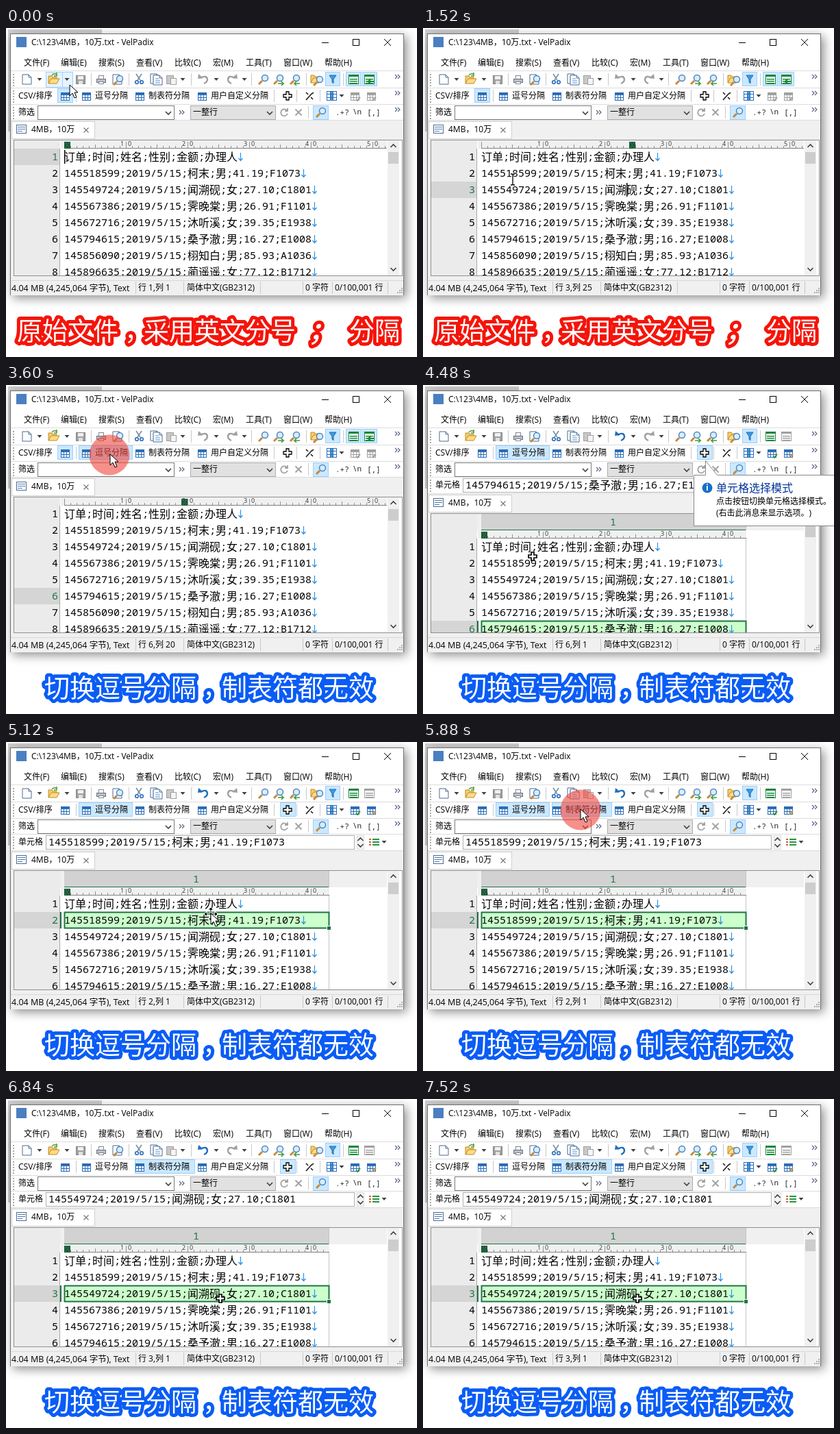
Recreate the animation shown at these times as an HTML page with a canvas. Size 600 by 480 pixels, loop 8000 ms.

```html
<!DOCTYPE html>
<html lang="zh-CN">
<head>
<meta charset="utf-8">
<style>
html, body { margin: 0; width: 600px; height: 480px; overflow: hidden; background: #fff }
canvas { display: block }
</style>
</head>
<body>
<canvas id="stage" width="600" height="480"></canvas>
<script>
const ctx = document.getElementById('stage').getContext('2d');
const LOOP = 8000;
const CJK = "'Noto Sans CJK SC','Noto Sans CJK',sans-serif";
const UI = "'Open Sans'," + CJK;
const MONO = "'Noto Sans Mono'," + CJK;
const BLUE = '#2b6cb5', GREEN = '#217346', GREY = '#a0a0a0', INK = '#404040', RULE = '#dcdcdc';

const rows = ['订单;时间;姓名;性别;金额;办理人'].concat([
  '145518599;柯末;男;41.19;F1073', '145549724;闻溯砚;女;27.10;C1801',
  '145567386;霁晚棠;男;26.91;F1101', '145672716;沐听溪;女;39.35;E1938',
  '145794615;桑予澈;男;16.27;E1008', '145856090;栩知白;男;85.93;A1036',
  '145896635;蔺遥遥;女;77.12;B1712'
].map(r => r.replace(';', ';2019/5/15;')));

// Each step changes only the listed parts of the state.
const steps = [
  { t: 0, cur: ['arrow', 93, 83], line: 1, col: 1, caret: true, open: 1, mode: 0, hot: 0 },
  { t: 200, cur: ['beam', 291, 226], open: .5 },
  { t: 640, cur: ['beam', 298, 228], open: 0 },
  { t: 1520, cur: ['beam', 131, 221], line: 3, col: 25 },
  { t: 1640, line: 2, col: 6 },
  { t: 2160, cur: ['beam', 259, 306], line: 6, col: 20, sel: true },
  { t: 2520, line: 5, col: 21, sel: false },
  { t: 2920, line: 6, col: 20, blue: true, caret: false },
  { t: 3160, cur: ['arrow', 212, 114] },
  { t: 3600, cur: ['arrow', 152, 101], hot: 1, click: [151, 102] },
  { t: 3920, mode: 1, col: 1, tip: true, click: null },
  { t: 4480, cur: ['plus', 160, 250] },
  { t: 4560, cur: ['plus', 235, 350] },
  { t: 5120, cur: ['move', 299, 251], line: 2, tip: false },
  { t: 5440, cur: ['arrow', 254, 163] },
  { t: 5880, cur: ['arrow', 230, 98], hot: 2, click: [230, 99] },
  { t: 6080, cur: ['plus', 300, 259], mode: 2, hot: 0, tip: true, click: null },
  { t: 6520, cur: ['plus', 301, 281] },
  { t: 6840, cur: ['plus', 313, 291], line: 3, tip: false },
  { t: 7400, click: [313, 291] },
  { t: 7520, click: null }
];
const stateAt = t => Object.assign({}, ...steps.filter(s => s.t <= t));

function box(x, y, w, h, fill, stroke) {
  if (fill) { ctx.fillStyle = fill; ctx.fillRect(x, y, w, h); }
  if (stroke) { ctx.strokeStyle = stroke; ctx.lineWidth = 1; ctx.strokeRect(x + .5, y + .5, w - 1, h - 1); }
}
function shape(d, x, y, fill, stroke, width = 1) {
  const p = new Path2D(d);
  ctx.save();
  ctx.translate(x, y);
  if (fill) { ctx.fillStyle = fill; ctx.fill(p); }
  if (stroke) { ctx.strokeStyle = stroke; ctx.lineWidth = width; ctx.stroke(p); }
  ctx.restore();
}
function disc(x, y, r, fill, stroke, width) {
  shape(`M${-r} 0a${r} ${r} 0 1 0 ${2 * r} 0a${r} ${r} 0 1 0 ${-2 * r} 0`, x, y, fill, stroke, width);
}
// y is the vertical middle of the line of text.
function text(s, x, y, color = '#000', size = 12, family = UI, weight = 400) {
  ctx.font = `${weight} ${size}px ${family}`;
  ctx.fillStyle = color;
  ctx.fillText(s, x, y + size * .36);
}
const advance = ch => ch > '\u2e80' ? 16 : 9;
const widthOf = s => [...s].reduce((w, ch) => w + advance(ch), 0);
function mono(s, x, y) {
  for (const ch of s) {
    text(ch, x, y, '#000', advance(ch) === 16 ? 16 : 15, MONO);
    x += advance(ch);
  }
  return x;
}
function caretX(s, col) {
  let c = 1, x = 85;
  for (const ch of s) {
    if (c >= col) break;
    c += advance(ch) === 16 ? 2 : 1;
    x += advance(ch);
  }
  return x;
}

const sep = (x, y) => box(x, y - 9, 1, 18, '#c8c8c8');
const drop = (x, y) => shape('M-3.5-2h7l-3.5 4z', x, y, INK);
const chevron = (x, y, up) => shape(up ? 'M-4 2l4-4 4 4' : 'M-4-2l4 4 4-4', x, y, null, '#404040', 1.6);
const lit = (x, y, w, h = 21, fill = '#cce8ff') => box(x, y, w, h, fill, '#99d1ff');
const cross = (x, y, r, color, w) => shape(`M${-r} ${-r}L${r} ${r}M${r} ${-r}L${-r} ${r}`, x, y, null, color, w);
const more = (x, y) => shape('M-4-3l3 3-3 3M0-3l3 3-3 3', x, y, null, '#506080', 1.1);
function grip(y) {
  for (let i = -8; i <= 8; i += 4) box(10, y + i, 2, 2, '#a8a8a8');
}
function page(x, y, lines, edge = '#4a6a90') {
  shape('M0 0h9l4 4v10H0z', x, y, '#fff', edge);
  shape('M9 0v4h4', x, y, null, edge);
  if (lines) shape('M3 5h5M3 8h7M3 11h7', x, y, null, '#4f93d8');
}
function grid(x, y, color = BLUE) {
  box(x, y, 13, 12, '#fff', color);
  box(x, y, 13, 4, color);
  shape('M0 7.5h13M4.5 4v8M8.5 4v8', x, y, null, color);
}
function folder(x, y) {
  shape('M0 12V1h5l1 2h6v3', x, y, '#f5cf72', '#c18a20');
  shape('M0 12l4-7h12l-4 7z', x, y, '#ffdc86', '#c18a20');
}
function lens(x, y, handle = '#c58a3c') {
  shape('M-2 2l-5 5', x, y, null, handle, 3);
  disc(x + 2, y - 2, 4.5, '#d9edfb', '#4a86c0', 1.5);
}
function printer(x, y) {
  box(x + 3, y, 8, 6, '#fff', '#808890');
  box(x, y + 5, 14, 6, '#b9c1ca', '#68727c');
  box(x + 3, y + 9, 8, 4, '#fff', '#808890');
}
function list(x, y, color) {
  box(x, y, 15, 14, '#fff', color);
  box(x, y, 15, 3, color);
  for (let i = 6; i < 13; i += 3) box(x + 2, y + i, 11, 1.5, color);
}
function turn(x, y, color, flip) {
  ctx.save();
  ctx.translate(x, y);
  ctx.scale(flip, 1);
  shape('M-4-2q9-5 10 2 0 4-5 6', 0, 0, null, color, 2.4);
  shape('M-8-1l1-7 7 6z', 0, 0, color);
  ctx.restore();
}

function drawFrame() {
  box(0, 0, 600, 480, '#fff');
  box(3, 2, 137, 149, '#cfcfcf');
  ctx.save();
  ctx.shadowColor = 'rgba(0,0,0,.45)';
  ctx.shadowBlur = 14;
  ctx.shadowOffsetX = ctx.shadowOffsetY = 4;
  box(6, 8, 575, 382, '#fff');
  ctx.restore();
  box(6, 8, 575, 382, '#fff', '#707070');
  box(15, 13, 15, 15, '#4a7fc0');
  text('C:\\123\\4MB，10万.txt - VelPadix', 37, 21);
  box(461, 21, 10, 1, '#000');
  box(506, 16, 10, 10, null, '#000');
  cross(557, 21, 5, '#000', 1);
  const menus = { 26: '文件(F)', 80: '编辑(E)', 135: '搜索(S)', 190: '查看(V)', 246: '比较(C)', 302: '宏(M)', 350: '工具(T)', 405: '窗口(W)', 465: '帮助(H)' };
  for (const x in menus) text(menus[x], +x, 51);
  for (const y of [62, 87, 111, 134]) box(7, y, 573, 1, RULE);
}

function drawMainBar(s) {
  const y = 75;
  grip(y);
  if (s.open) {
    ctx.globalAlpha = s.open;
    lit(58, 64, 40, 23, '#e5f3ff');
    box(82, 64, 1, 23, '#99d1ff');
    ctx.globalAlpha = 1;
  }
  page(24, 68);
  folder(62, 69);
  shape('M3 0q3-4 7-1v-3 5h-4', 64, 69, null, '#4c9a35', 1.5);
  box(102, 69, 14, 13, GREY, '#858585');
  box(105, 70, 8, 5, '#f0f0f0');
  box(106, 77, 6, 5, '#e0e0e0');
  printer(132, 69);
  page(156, 68);
  lens(164, 76);
  shape('M-4-6l6 9M4-6l-6 9', 194, 73, null, '#7590a8', 1.6);
  disc(191, 79, 2.3, null, BLUE, 1.6);
  disc(198, 79, 2.3, null, BLUE, 1.6);
  page(211, 67, true);
  page(215, 69, true);
  box(234, 69, 11, 13, '#c8c8c8', GREY);
  box(240, 73, 9, 10, '#f4f4f4', GREY);
  turn(288, y, s.mode ? '#1f6fc0' : GREY, 1);
  turn(330, y, GREY, -1);
  lens(376, y);
  lens(398, y);
  shape('M-3 4h8l-3-3m3 3l-3 3', 400, 77, null, '#3d9b35', 1.5);
  lens(422, y);
  shape('M5 4h-8l3-3m-3 3l3 3', 424, 77, null, '#3d9b35', 1.5);
  folder(445, 68);
  lens(456, 77);
  lit(466, 64, 22);
  shape('M-5-6H5L1 0v6l-2-2V0z', 477, y, '#3f9ae0', '#1d6fb5');
  if (!s.mode) { lit(496, 64, 23); lit(520, 64, 22); }
  list(500, 68, '#16863a');
  list(523, 68, s.mode ? GREY : '#16863a');
  if (!s.mode) shape('M5 0h-8l3-3m-3 3l3 3', 532, 78, null, '#16863a', 2);
  for (const x of [49, 89, 258, 307, 348]) drop(x, y);
  for (const x of [124, 179, 270, 358, 438, 492]) sep(x, y);
  more(572, 71);
}

function drawCsvBar(s) {
  const y = 99;
  grip(y);
  text('CSV/排序', 18, y);
  if (!s.mode) lit(75, 88, 23);
  if (s.mode === 1 || s.hot === 1) lit(106, 88, 79);
  if (s.mode === 2 || s.hot === 2) lit(188, 88, 88);
  if (s.mode) lit(400, 88, 23);
  for (const x of [80, 111, 189, 280]) grid(x, 94);
  for (const x of [503, 527]) grid(x, 94, s.mode ? BLUE : GREY);
  text('逗号分隔', 130, y);
  text('制表符分隔', 208, y);
  text('用户自定义分隔', 299, y);
  plus(411, y, 1.3);
  shape('M-5 6L4-4M-5-5l3 3M6-5l-2 2M5 5l-3-3', 443, y, null, '#202020', 1.7);
  box(468, 92, 15, 14, '#fff', BLUE);
  box(473, 92, 5, 14, '#3f9ae0', BLUE);
  shape('M0 4.5h15M0 9.5h15', 468, 92, null, BLUE);
  drop(490, y);
  shape('M0 0l2 2 4-5', 511, 104, null, s.mode ? '#2a9440' : GREY, 2);
  shape('M0 4l5-5', 535, 102, null, s.mode ? '#d08a30' : GREY, 2);
  for (const x of [102, 391, 424, 458]) sep(x, y);
  more(572, 95);
}

function drawFilterBar() {
  const y = 123;
  grip(y);
  text('筛选', 18, y);
  box(46, 113, 200, 21, '#fff', '#7a7a7a');
  chevron(237, y + 1);
  more(257, y);
  box(269, 113, 125, 21, '#e1e1e1', '#adadad');
  text('一整行', 273, y);
  chevron(385, y + 1);
  shape('M4-3A5 5 0 1 0 5 2M5-6v4H1', 406, y, null, GREY, 1.8);
  cross(427, y, 4.5, GREY, 1.8);
  sep(441, y);
  lit(448, 113, 23);
  lens(460, y);
  text('.+?', 481, y, '#222', 11, MONO, 500);
  text('\\n', 506, y - 1, '#222', 11, MONO, 500);
  text('[,]', 527, y, '#222', 11, MONO, 500);
  more(572, 119);
}

function drawTab(s, shift) {
  if (s.mode) {
    grip(146);
    text('单元格', 18, 146);
    box(58, 136, 451, 21, '#fff', '#b0b0b0');
    mono(rows[s.line - 1], 62, 146);
    box(512, 136, 11, 21, '#f4f4f4', '#dedede');
    chevron(517.5, 142, true);
    chevron(517.5, 151);
    shape('M5 2h10M5 6h10M5 10h10', 530, 140, null, '#2a9440', 2);
    shape('M0 2h3M0 6h3M0 10h3', 530, 140, null, '#d06030', 2);
    drop(552, 146);
    box(7, 158, 573, 1, RULE);
  }
  box(7, 135 + shift, 573, 255 - shift, '#f0f0f0');
  box(8, 136 + shift, 122, 26, '#fff', '#d0d0d0');
  box(15, 141 + shift, 15, 13, '#fff', '#4a6a90');
  shape('M2 3.5h11M2 6.5h11M2 9.5h7', 15, 141 + shift, null, '#4f78b0');
  text('4MB，10万', 37, 148 + shift);
  cross(117, 149 + shift, 3.5, '#777', 1.2);
  box(11, 163 + shift, 568, 199 - shift, '#fff', '#909090');
}

function drawRuler(s, y, right) {
  box(80, y, right - 80, 12, '#f0f0f0');
  box(85, y + 11, right - 85, 1, '#808080');
  for (let i = 0, x = 85; x < right; i++, x += 9) {
    const h = i % 10 ? (i % 5 ? 3 : 5) : 9;
    box(x, y + 11 - h, 1, h, '#909090');
    if (i && i % 10 === 0) {
      text(i / 10, x - 8, y + 5, '#333', 9);
      text('0', x + 3, y + 5, '#333', 9);
    }
  }
  const x = 85 + 9 * (s.col - 1);
  box(x, y + 2, 9, 10, '#1d5a3a');
  shape('M2 2h1M6 2h1M4 5h1M2 8h1M6 8h1', x, y + 2, null, '#5c9a78');
}

function drawEditor(s, shift) {
  const top = s.mode ? 224 : 176;
  const right = s.mode ? 472 : 556;
  const lineTop = top + 24 * (s.line - 1);
  ctx.save();
  ctx.beginPath();
  ctx.rect(12, 164 + shift, 566, 197 - shift);
  ctx.clip();
  box(12, 164 + shift, 67, 198, '#ebebeb');
  if (s.mode) {
    box(79, 188, 477, 24, '#f0f0f0');
    box(85, 188, 387, 24, '#d2d2d2');
    box(85, 211, 387, 1, GREEN);
    text('1', 273, 200, GREEN, 15, MONO);
    box(471, 188, 1, 173, '#c4c4c4');
  }
  drawRuler(s, top - 12, right);
  box(78, top, 1, 200, '#a8a8a8');
  box(12, lineTop, 66, 24, '#d5d5d5');
  if (s.mode) {
    box(79, lineTop, 2, 24, GREEN);
    box(85, lineTop, 387, 24, '#ccffcc');
  }
  rows.forEach((row, i) => {
    const n = i + 1, y = top + 24 * i;
    if (s.sel && n > 1 && n <= s.line) {
      const from = n === 2 ? 130 : 85;
      const to = n === s.line ? caretX(row, s.col) : 94 + widthOf(row);
      box(from, y, to - from, 24, '#a9d1f7');
    }
    text(n, 67, y + 12, n === s.line ? GREEN : '#000', 15, MONO);
    const end = mono(row, 85, y + 12);
    shape('M0-6V5M-3 2l3 3.5L3 2', end + 4.5, y + 12, null, '#2a92e8', 1.2);
  });
  if (s.mode) {
    shape('M0 0h386v23H0z', 85.5, lineTop + .5, null, GREEN, 2);
    box(468, lineTop + 20, 6, 6, '#fff');
    box(469, lineTop + 21, 5, 5, GREEN);
  } else if (s.caret) {
    box(caretX(rows[s.line - 1], s.col), lineTop + 2, 1.5, 20, '#000');
  }
  box(557, 164 + shift, 17, 198, '#f0f0f0');
  chevron(565.5, 172 + shift, true);
  box(558, 181 + shift, 15, 17, '#cdcdcd');
  chevron(565.5, 352);
  ctx.restore();
}

function drawStatus(s) {
  const y = 379;
  box(7, 368, 573, 1, '#d8d8d8');
  text('4.04 MB (4,245,064 字节), Text', 8, y, '#000', 12.5);
  text(`行 ${s.line},列 ${s.col}`, 193, y);
  text('简体中文(GB2312)', 264, y);
  text(s.sel ? '154 字符' : '0 字符', s.sel ? 424 : 437, y);
  text(`${s.sel ? 5 : 0}/100,001 行`, 480, y);
  for (const x of [189, 259, 371, 433, 476, 557]) if (!s.sel || x !== 433) sep(x, y);
  for (let i = 0; i < 3; i++)
    for (let j = 0; j <= i; j++) box(577 - 3 * j, 379 + 3 * i, 2, 2, '#b0b0b0');
}

function drawTip() {
  shape('M0 0l17 21H205V95H-17V21H0z', 412.5, 110.5, '#fff', '#888');
  disc(415, 150, 7.5, '#1470c8');
  text('i', 413, 150, '#fff', 12, UI, 700);
  text('单元格选择模式', 428, 150, '#003399', 16);
  text('点击按钮切换单元格选择模式。', 428, 170);
  text('(右击此消息来显示选项。)', 428, 187);
}

function plus(x, y, width = 1.7) {
  shape('M-2-6h4v4h4v4h-4v4h-4v-4h-4v-4h4z', x, y, '#fff', '#000', width);
}
function arrow(x, y) {
  shape('M0 0v16l4-4 3 7 3-1-3-7h5z', x, y, '#fff', '#000');
}
const cursors = {
  arrow,
  plus: (x, y) => plus(x, y),
  beam(x, y) {
    const d = 'M-3-8h2l1 1 1-1h2M0-7V7M-3 8h2l1-1 1 1h2';
    shape(d, x, y, null, '#fff', 2.6);
    shape(d, x, y, null, '#000', 1.3);
  },
  move(x, y) {
    shape('M0-10l4 4H1v5h5v-3l4 4-4 4V1H1v5h3l-4 4-4-4h3V1h-5v3l-4-4 4-4v3h5v-5h-3z', x, y, '#000', '#fff');
    arrow(x, y - 1);
  }
};

function outlined(s, x, color, style) {
  ctx.font = `${style} 37px ${CJK}`;
  ctx.lineJoin = 'round';
  ctx.lineWidth = 10;
  ctx.strokeStyle = color;
  ctx.fillStyle = '#fff';
  ctx.strokeText(s, x, 456);
  ctx.fillText(s, x, 456);
  ctx.lineJoin = 'miter';
}
// The comma sits in the middle of its cell.
function caption(s, x, color) {
  const [before, after] = s.split('，');
  const commaX = x + 37 * before.length;
  outlined(before, x, color, 500);
  outlined('，', commaX + 9, color, 500);
  outlined(after, commaX + 37, color, 500);
}

function draw(s) {
  const shift = s.mode ? 24 : 0;
  drawFrame();
  drawMainBar(s);
  drawCsvBar(s);
  drawFilterBar();
  drawTab(s, shift);
  drawEditor(s, shift);
  drawStatus(s);
  if (s.tip) drawTip();
  if (s.blue) caption('切换逗号分隔，制表符都无效', 56, '#0a5cf5');
  else {
    caption('原始文件，采用英文分号', 16, '#f5140a');
    outlined('；', 442, '#f5140a', 'italic 700');
    outlined('分隔', 501, '#f5140a', 500);
  }
  if (s.click) disc(...s.click, 29.5, 'rgba(240,70,60,.6)');
  cursors[s.cur[0]](s.cur[1], s.cur[2]);
}

const start = performance.now();
function tick(now) {
  draw(stateAt(Math.max(0, now - start) % LOOP));
  requestAnimationFrame(tick);
}
tick(start);
</script>
</body>
</html>
```
